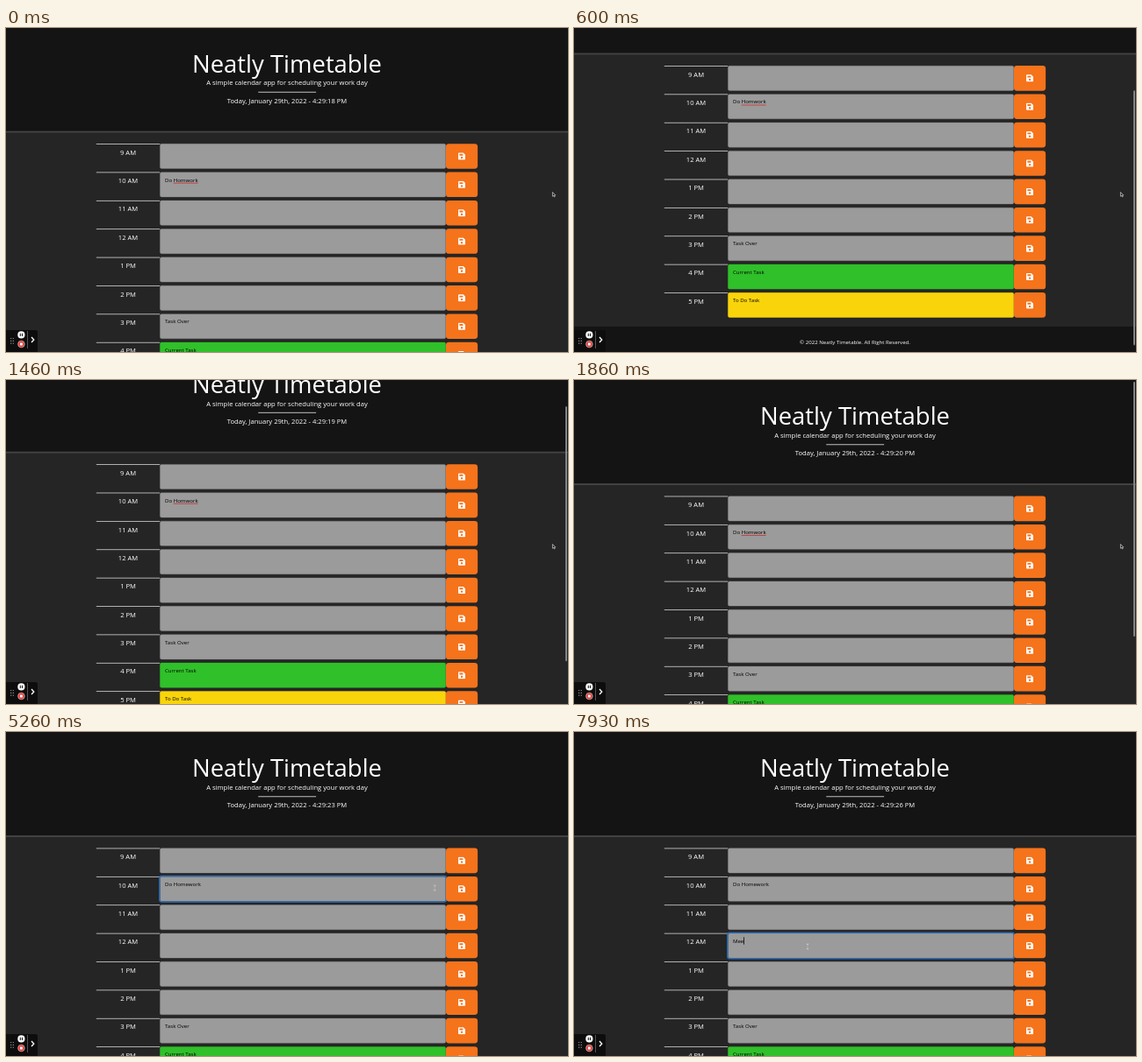
Write an HTML page that moves like this. It is 640 px wide and 370 px high and loops after 8 s.

```html
<!DOCTYPE html>
<html lang="en">
<head>
<meta charset="utf-8">
<title>Neatly Timetable</title>
<style>
  @property --scroll { syntax: "<length>"; inherits: true; initial-value: 0px; }

  html, body { margin: 0; width: 100%; height: 100%; overflow: hidden; background: #252525; }
  body { position: relative; animation: scroll 8s linear infinite; }

  /* The page is laid out 1680px wide and shown at 640px. */
  .page {
    position: absolute; left: 0; top: 0; width: 1680px; height: 1216px;
    transform-origin: 0 0;
    transform: scale(.38095) translateY(calc(-1 * var(--scroll)));
    font: 16px/24px "Open Sans", sans-serif; color: #fff;
  }
  header {
    position: absolute; top: 0; width: 100%; height: 310px;
    background: #141414; border-bottom: 5px solid #444; text-align: center;
  }
  header > * { position: absolute; left: 0; right: 0; margin: 0; font-size: 20px; line-height: 30px; }
  header h1 { top: 63px; font-size: 72px; line-height: 86px; font-weight: 400; }
  header .tagline { top: 151px; }
  header hr { top: 192px; width: 173px; height: 2.5px; margin: 0 auto; border: 0; background: #aaa; }
  header .clock { top: 204px; }

  .row { position: absolute; left: 270px; width: 1140px; height: 75px; }
  .row > * { position: absolute; top: 0; box-sizing: border-box; height: 75px; }
  .hour {
    left: 0; width: 190px; padding-top: 9px; border-top: 2.5px solid #ddd;
    font-size: 20px; line-height: 30px; text-align: center;
  }
  .task {
    left: 190px; width: 855px; padding: 10px 14px; white-space: pre;
    border: 1px solid #868686; border-radius: 5px; background: #9b9b9b; color: #000;
  }
  .task.now { background: #30c02a; border-color: #30c02a; }
  .task.next { background: #f9d40b; border-color: #f9d40b; }
  .task.focus { outline: 4px solid #2f6db5; outline-offset: -1px; }
  .typo { text-decoration: underline #d3262b 2px; text-underline-offset: 3px; }
  .caret { position: absolute; width: 2px; height: 22px; margin-top: 1px; background: #000; }
  .save { left: 1045px; width: 95px; border-radius: 9px; background: #f5731b; }
  .save svg { position: absolute; left: 36px; top: 26px; width: 23px; height: 23px; }

  footer {
    position: absolute; top: 1130px; width: 100%; height: 100px; padding-top: 35px;
    box-sizing: border-box; background: #141414; text-align: center;
  }

  .thumb {
    position: absolute; left: 637px; top: 1.7px; width: 2.4px; height: 291px;
    border-radius: 2px; background: #858585;
    transform: translateY(calc(var(--scroll) * .295));
    animation: thumb 8s linear infinite;
  }
  .recorder { position: absolute; left: 0; top: 345px; width: 37px; height: 25px; }
  .pointer { position: absolute; left: 0; top: 0; animation: move 8s ease-in-out infinite; }
  .pointer svg { position: absolute; left: -5px; top: -5px; width: 10px; height: 10px; }
  .arrow { animation: arrow 8s step-end infinite; }
  .beam { animation: beam 8s step-end infinite; }

  @keyframes scroll {
    0% { --scroll: 1px; animation-timing-function: cubic-bezier(.45, .1, .75, .7); }
    4.125% { --scroll: 124px; animation-timing-function: cubic-bezier(.2, .5, .45, 1); }
    9.375%, 14.625% { --scroll: 245px; animation-timing-function: cubic-bezier(.45, .1, .75, .7); }
    18.25% { --scroll: 96px; animation-timing-function: cubic-bezier(.2, .5, .45, 1); }
    23.25%, 100% { --scroll: 0px; }
  }
  @keyframes thumb {
    0% { opacity: 0; }
    1%, 29% { opacity: 1; }
    32%, 100% { opacity: 0; }
  }
  @keyframes move {
    0%, 25.75% { transform: translate(623px, 190px); }
    35.75%, 59.4% { transform: translate(207px, 174px); animation-timing-function: ease-in; }
    65.75% { transform: translate(488px, 178px); animation-timing-function: ease-out; }
    68.1%, 78.1% { transform: translate(519px, 180px); }
    85.6%, 100% { transform: translate(266px, 245px); }
  }
  @keyframes arrow { 0% { opacity: 1; } 29% { opacity: 0; } 66.3% { opacity: 1; } 79.5% { opacity: 0; } }
  @keyframes beam { 0% { opacity: 0; } 29% { opacity: 1; } 66.3% { opacity: 0; } 79.5% { opacity: 1; } }
</style>
</head>
<body>
<main class="page">
  <header>
    <h1>Neatly Timetable</h1>
    <p class="tagline">A simple calendar app for scheduling your work day</p>
    <hr>
    <p class="clock"></p>
  </header>
  <section class="rows"></section>
  <footer>© 2022 Neatly Timetable. All Right Reserved.</footer>
</main>

<div class="thumb"></div>

<svg class="recorder" viewBox="0 0 37 25">
  <path d="M0 0H34Q36 0 36 2V25H0Z" fill="#0d0d0d"/>
  <path d="M5.7 9v7M8.3 9v7" stroke="#999" stroke-width="1.1" stroke-dasharray="1.1 1.7"/>
  <circle cx="17.4" cy="5.4" r="4.1" fill="#fff"/>
  <path d="M16.3 3.7v3.4M18.5 3.7v3.4" stroke="#222" stroke-width="1.1"/>
  <circle cx="17.4" cy="16" r="3.8" fill="#e0352f" stroke="#f3dada" stroke-width=".6"/>
  <rect x="15.9" y="14.5" width="3" height="3" fill="#fff"/>
  <path d="M24.5 1v20" stroke="#666" stroke-width=".8"/>
  <path d="M29 8l2.8 3L29 14" fill="none" stroke="#fff" stroke-width="1.3"/>
</svg>

<div class="pointer">
  <svg class="arrow" viewBox="-5 -5 10 10">
    <path d="M-.6-2.5V2.2L.5 1.2 1.3 2.9 2.1 2.5 1.4 1H2.8Z" fill="#111" stroke="#ddd" stroke-width=".7"/>
  </svg>
  <svg class="beam" viewBox="-5 -5 10 10">
    <path d="M-1.2-3Q0-3 0-2V2Q0 3-1.2 3M1.2-3Q0-3 0-2M0 2Q0 3 1.2 3" fill="none" stroke="#d0d0d0" stroke-width="1"/>
    <path d="M0-2V2" stroke="#666" stroke-width=".4"/>
  </svg>
</div>

<script>
  const LOOP = 8000;
  const hours = ["9 AM", "10 AM", "11 AM", "12 AM", "1 PM", "2 PM", "3 PM", "4 PM", "5 PM"];
  const notes = { 6: "Task Over", 7: "Current Task", 8: "To Do Task" };
  const kinds = { 7: "now", 8: "next" };
  const disk = `<svg viewBox="0 0 23 23"><path fill="#fff" fill-rule="evenodd"
    d="M3 1H16L22 7V20Q22 22 20 22H3Q1 22 1 20V3Q1 1 3 1ZM4.5 4.5V9.5H15V4.5ZM11.5 12.5a3.2 3.2 0 1 0 .01 0Z"/></svg>`;

  document.querySelector(".rows").innerHTML = hours.map((hour, i) => `
    <div class="row" style="top:${347.5 + 85 * i}px">
      <div class="hour">${hour}</div>
      <div class="task ${kinds[i] || ""}">${notes[i] || ""}</div>
      <div class="save">${disk}</div>
    </div>`).join("");

  const tasks = document.querySelectorAll(".task");
  const clock = document.querySelector(".clock");
  const caret = '<span class="caret"></span>';

  // Each edit: [time, text before the caret, text after it]
  const homework = {
    task: tasks[1], focus: 3730, blur: 5800,
    edits: [[0, 'Do <span class="typo">Hom', "work</span>"], [3730, 'Do <span class="typo">Hom', "work</span>"],
            [4270, "Do Home", "work"]]
  };
  const meeting = {
    task: tasks[3], focus: 6950, blur: LOOP,
    edits: [[0, "", ""], [6950, "", ""], [7460, "M", ""], [7660, "Me", ""], [7860, "Mee", ""]]
  };

  function setHtml(element, html) {
    if (element.shown !== html) element.innerHTML = element.shown = html;
  }

  function drawField({ task, focus, blur, edits }, t) {
    const [since, before, after] = edits.findLast(edit => edit[0] <= t);
    const focused = t >= focus && t < blur;
    const caretOn = focused && Math.floor((t - since) / 500) % 2 === 0;
    task.classList.toggle("focus", focused);
    setHtml(task, before + (caretOn ? caret : "") + after);
  }

  function draw(t) {
    const second = 18 + Math.floor((t + 300) / 1000);
    setHtml(clock, `Today, January 29th, 2022 - 4:29:${second} PM`);
    drawField(homework, t);
    drawField(meeting, t);
  }

  let start;
  function tick(now) {
    start ??= now;
    draw((now - start) % LOOP);
    requestAnimationFrame(tick);
  }
  draw(0);
  requestAnimationFrame(tick);
</script>
</body>
</html>
```
